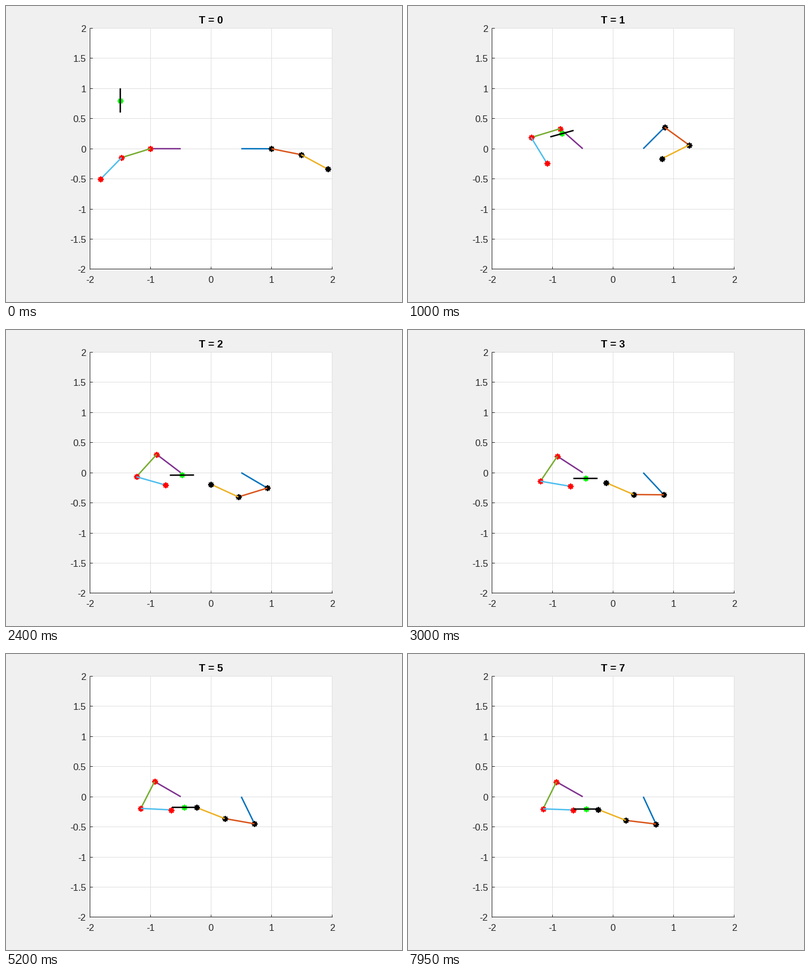
Recreate the animation shown at these times as a matplotlib script. Size 700 px wide and 525 px high, loop 8 s.

```python
import numpy as np
import matplotlib.pyplot as plt
from matplotlib.animation import FuncAnimation

W, H, DPI = 700, 525, 100
FRAMES, STEP = 160, 50
PT = 72 / DPI                     # one pixel in points
LINK, ROD = 0.5, 0.4
INK, GRID = "#262626", "#dfdfdf"

plt.rcParams["font.family"] = "Liberation Sans"


def px(x):
    return 362.4 + 106.97 * np.asarray(x)


def py(y):
    return 253.1 - 106.92 * np.asarray(y)


def settle(t, start, end, p, q=None):
    """Second-order response from rest; a complex pole p brings its conjugate."""
    q = np.conj(p) if q is None else q
    left = (q * np.exp(-p * t) - p * np.exp(-q * t)) / (q - p)
    return end + (start - end) * np.real(left)


def right_hand(t):
    x = settle(t, 1.929, -0.252, 1.05, 3.5)
    y = np.interp(t, [0, 1, 1.8, 3, 4.25, 7],
                  [-0.339, -0.164, -0.22, -0.164, -0.164, -0.21])
    return x, y, settle(t, -28.65, -201.5, 1.66 + 1.32j)


def left_hand(t):
    x = settle(t, -1.826, -0.656, 1.08, 12)
    y = settle(t, -0.506, -0.22, 1.1 + 1.9j)
    return x, y, settle(t, 225.84, 358, 1, 7)


def rod_pose(t):
    x = settle(t, -1.5, -0.445, 2 + 0.5j)
    y = -0.215 + 1.015 * (0.75 * np.exp(-0.95 * t) + 0.25 * np.exp(-0.4 * t))
    return x, y, np.radians(settle(t, 90, 0, 3.1, 3.3))


def solve_arm(base, side, hand):
    """Joint positions of a three-link arm for a hand position and angle."""
    hx, hy, angle = hand
    wx = hx - LINK * np.cos(np.radians(angle))
    wy = hy - LINK * np.sin(np.radians(angle))
    reach = min(np.hypot(wx - base, wy) / (2 * LINK), 1)
    first = np.arctan2(wy, wx - base) + side * np.arccos(reach)
    ex, ey = base + LINK * np.cos(first), LINK * np.sin(first)
    return px([base, ex, wx, hx]), py([0, ey, wy, hy])


fig = plt.figure(figsize=(W / DPI, H / DPI), dpi=DPI, facecolor="#f0f0f0")
ax = fig.add_axes([0, 0, 1, 1])
ax.set_xlim(0, W)
ax.set_ylim(H, 0)
ax.axis("off")


def line(xs, ys, color, width, z):
    return ax.plot(xs, ys, color=color, lw=width * PT, zorder=z,
                   solid_capstyle="butt")[0]


def star(color, z):
    return ax.plot([], [], ls="none", marker=(8, 2, 0), ms=10 * PT,
                   mew=2 * PT, mec=color, zorder=z)[0]


def label(x, y, text, size=16.67, **kw):
    return ax.text(x, y, text, fontsize=size * PT, va="baseline", **kw)


# Plot area, grid, axes and labels on whole pixels
x0, x1 = np.floor(px([-2, 2]))
y0, y1 = np.floor(py([-2, 2]))
ax.add_patch(plt.Rectangle((x0, y1), x1 - x0 + 1, y0 - y1 + 1,
                           fc="white", ec="none"))
for v in range(-2, 3):
    x = np.floor(px(v))
    line([x, x], [y0, y1], GRID, 1, 2)
    line([x, x], [y0, y0 - 4], INK, 1, 4)
    label(px(v), 491, str(v), color=INK, ha="center")
for v in np.arange(-2, 2.1, 0.5):
    y = np.floor(py(v))
    line([x0, x1], [y, y], GRID, 1, 2)
    line([x0, x0 + 5], [y, y], INK, 1, 4)
    label(141.5, y + 6.6, f"{v:g}", color=INK, ha="right")
line([x0, x1 + 1], [y0, y0], INK, 1, 4)
line([x0, x0], [y0 + 1, y1], INK, 1, 4)
title = label(362.7, 31, "T = 0", 18.33, color="black", ha="center",
              weight="bold")


def make_arm(colors, mark, z):
    return [(line([], [], c, 2.5, z + 2 * k), star(mark, z + 2 * k + 1))
            for k, c in enumerate(colors)]


right_arm = make_arm(["#0072bd", "#d95319", "#edb120"], "black", 10)
left_arm = make_arm(["#7e2f8e", "#77ac30", "#4dbeee"], "red", 20)
rod_star = star("lime", 30)
rod_line = line([], [], "black", 2.5, 31)


def place(arm, xs, ys):
    for k, (link, joint) in enumerate(arm):
        link.set_data(xs[k:k + 2], ys[k:k + 2])
        joint.set_data(xs[k + 1:k + 2], ys[k + 1:k + 2])


def draw(i):
    t = i * STEP / 1000
    title.set_text(f"T = {i * STEP // 1000}")
    place(right_arm, *solve_arm(0.5, 1, right_hand(t)))
    place(left_arm, *solve_arm(-0.5, -1, left_hand(t)))
    x, y, tilt = rod_pose(t)
    half = np.array([-ROD / 2, ROD / 2])
    rod_star.set_data([px(x)], [py(y)])
    rod_line.set_data(px(x + half * np.cos(tilt)),
                      py(y + half * np.sin(tilt)))
    return []


anim = FuncAnimation(fig, draw, frames=FRAMES, interval=STEP,
                     init_func=lambda: draw(0), repeat=True, repeat_delay=0)
plt.show()
```
